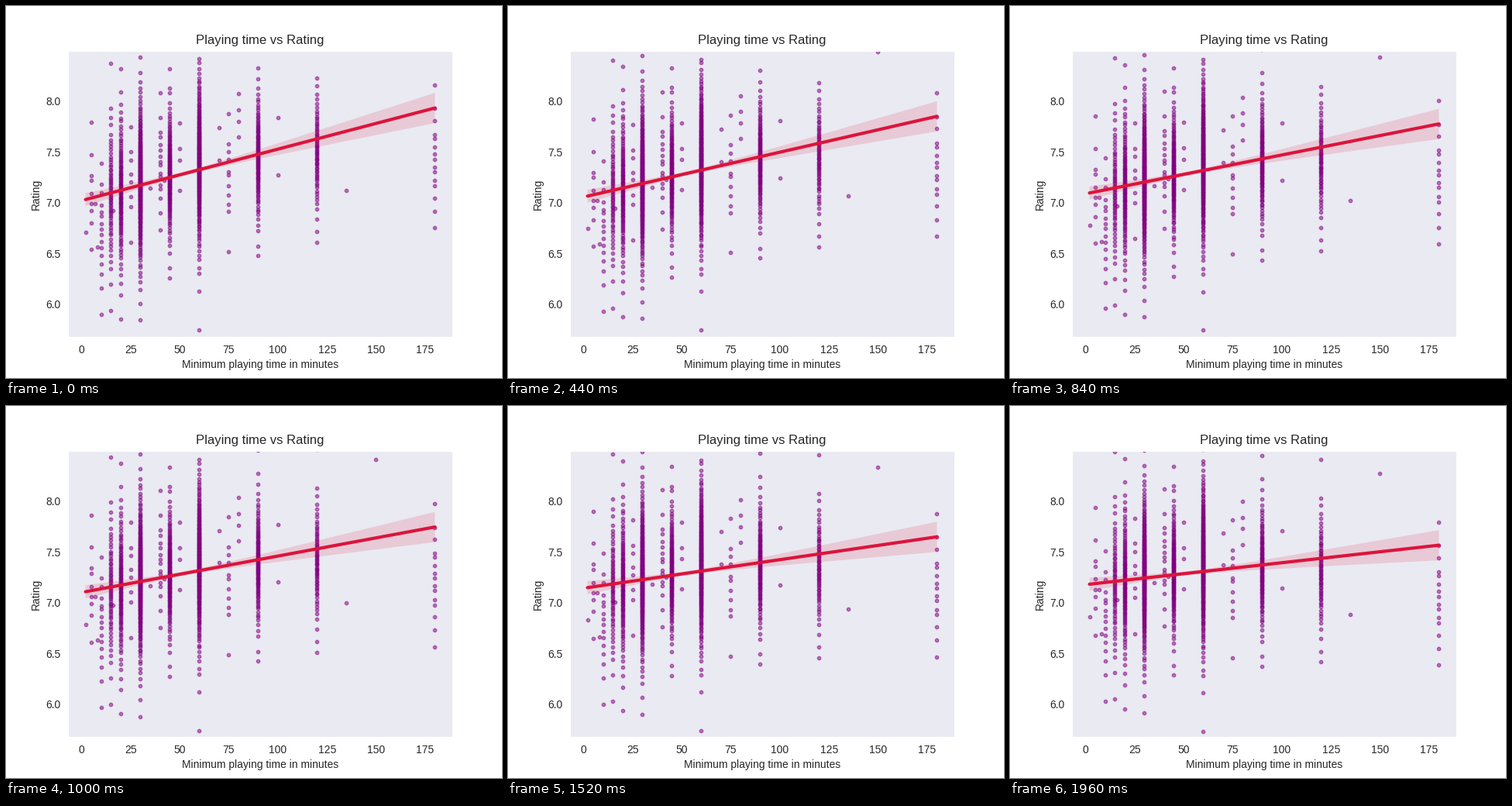
These frames come from a looping animation (640x480 px, 2 s). A matplotlib script:

```python
import numpy as np
import matplotlib.pyplot as plt
from matplotlib.animation import FuncAnimation

FRAMES = 50
PIVOT, MEAN = 54, 7.294          # everything tilts about this centre
SLOPE, SLOPE_DROP = 0.00507, 0.00291

plt.rcParams.update({
    "font.family": "Liberation Sans",
    "text.color": ".15",
    "axes.labelcolor": ".15",
    "xtick.color": ".15",
    "ytick.color": ".15",
    "axes.facecolor": "#EAEAF2",
    "axes.edgecolor": "white",
})

# minutes: (count, centre, spread) of the ratings
COLUMNS = {
    5: (9, 7.10, 0.21), 10: (16, 6.70, 0.23), 15: (60, 7.08, 0.24),
    20: (105, 7.10, 0.24), 25: (8, 7.25, 0.20), 30: (220, 7.20, 0.24),
    40: (16, 7.38, 0.20), 45: (125, 7.28, 0.20), 50: (4, 7.50, 0.15),
    60: (220, 7.40, 0.25), 70: (2, 7.49, 0.17), 75: (11, 7.25, 0.20),
    80: (4, 7.85, 0.10), 90: (105, 7.45, 0.20), 100: (2, 7.68, 0.38),
    120: (65, 7.50, 0.20), 180: (15, 7.42, 0.23),
}
SINGLES = {2: 6.71, 7: 6.99, 8: 6.56, 16: 6.92, 35: 7.14, 42: 7.22,
           135: 7.12, 150: 8.55}


def make_points(seed=7):
    """Spread each column by evenly stratified logistic draws."""
    rng = np.random.default_rng(seed)
    xs, ys = list(SINGLES), list(SINGLES.values())
    for x, (count, centre, spread) in COLUMNS.items():
        u = (np.arange(count) + rng.uniform(0.2, 0.8, count)) / count
        xs.extend([x] * count)
        ys.extend(centre + spread * np.log(u / (1 - u)))
    return np.array(xs), np.array(ys)


xs, ys = make_points()
grid = np.linspace(2, 180, 100)
half = np.hypot(0.021, 0.00117 * (grid - PIVOT))

fig, ax = plt.subplots(figsize=(6.4, 4.8), dpi=100)
ax.set(xlim=(-6.9, 188.9), ylim=(5.675, 8.498),
       xticks=range(0, 176, 25), yticks=np.arange(6, 8.1, 0.5),
       title="Playing time vs Rating",
       xlabel="Minimum playing time in minutes", ylabel="Rating")
ax.tick_params(bottom=False, left=False)

dots = ax.scatter(xs, ys, s=10, color="purple", alpha=0.5, linewidths=1)
band = ax.fill_between(grid, MEAN - half, MEAN + half,
                       facecolor="crimson", alpha=0.15, linewidth=0)
line, = ax.plot(grid, np.full_like(grid, MEAN), color="crimson", lw=3,
                solid_capstyle="round")


def update(i):
    drop = SLOPE_DROP * i / (FRAMES - 1)
    dots.set_offsets(np.column_stack([xs, ys - drop * (xs - PIVOT)]))
    fit = MEAN + (SLOPE - drop) * (grid - PIVOT)
    line.set_ydata(fit)
    edge = np.concatenate([fit + half, (fit - half)[::-1]])
    band.set_verts([np.column_stack([np.r_[grid, grid[::-1]], edge])])
    return dots, band, line


anim = FuncAnimation(fig, update, frames=FRAMES, interval=40, repeat=True,
                     repeat_delay=0)
plt.show()
```
